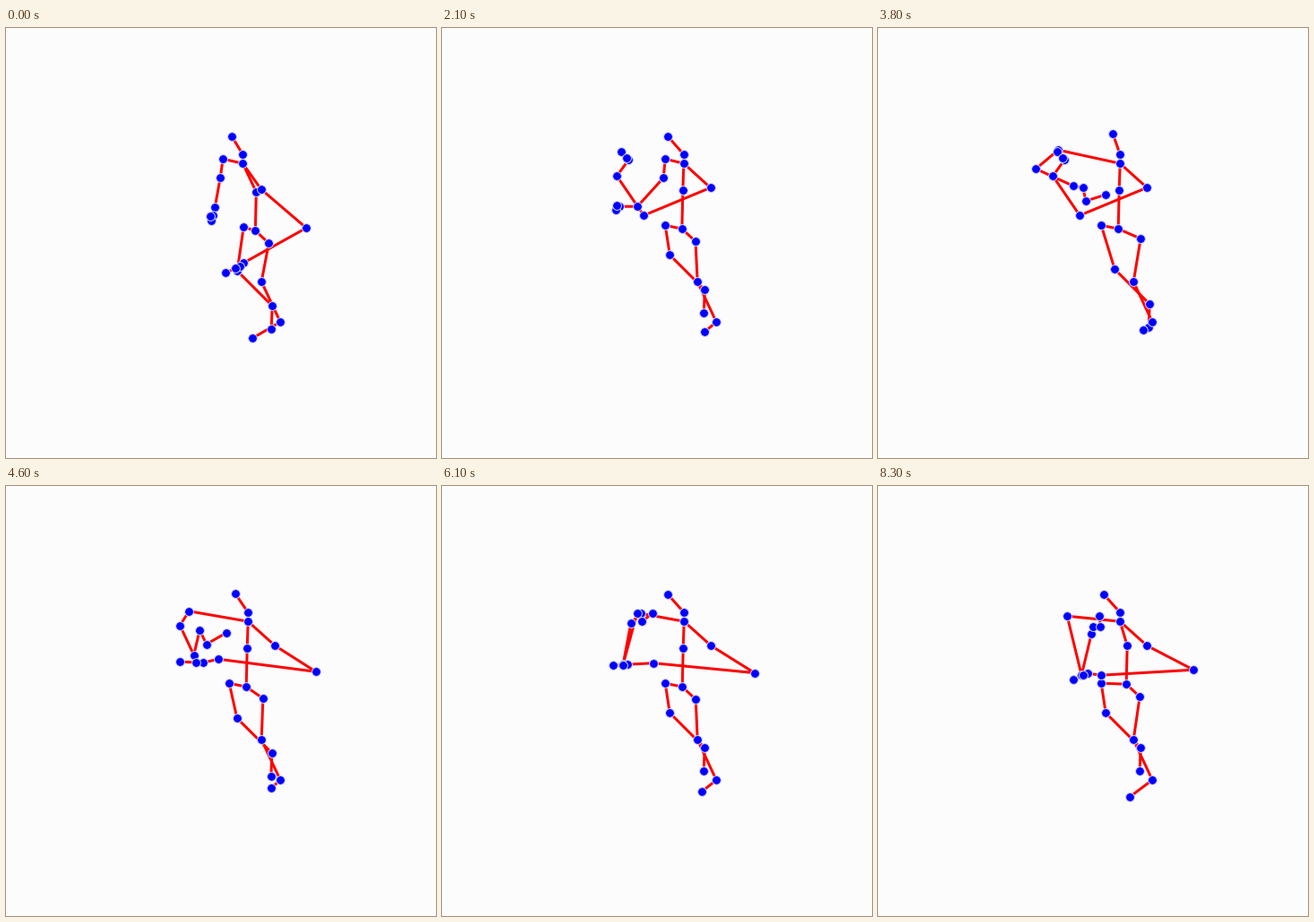
Recreate the animation shown at these times as a matplotlib script. Size 480 by 480 pixels, loop 8.4 s.

```python
import numpy as np
import matplotlib.pyplot as plt
from matplotlib.animation import FuncAnimation

SIZE, DPI = 480, 100
FRAMES, STEP_MS = 84, 100
PX = 72 / DPI
OFFSET = -0.8

REST = {
    "head": (253, 122), "neck": (271, 142), "chest": (271, 152),
    "waist": (270, 182), "base": (269, 225),
    "hip_l": (250, 221), "knee_l": (255, 254),
    "ankle_l": (294, 293), "foot_l": (293, 319),
    "hip_r": (284, 239), "knee_r": (286, 284),
    "ankle_r": (307, 329), "foot_r": (297, 338),
    "shoulder_r": (301, 179),
}

# Arm poses at key moments, eased in between.
LEFT_ARM = "shoulder_l elbow_l wrist_l hand_l tip_l".split()
LEFT_POSES = {
    9: [(243, 147), (240, 168), (228, 202), (226, 211), (224, 217)],
    21: [(250, 147), (248, 168), (219, 200), (199, 200), (195, 204)],
    38: [(202, 137), (177, 158), (219, 177), (230, 179), (255, 187)],
    54: [(208, 144), (213, 155), (202, 202), (204, 144), (239, 142)],
    69: [(241, 142), (210, 153), (204, 198), (236, 142), (233, 143)],
    83: [(212, 146), (228, 212), (239, 166), (241, 158), (248, 146)],
}
RIGHT_ARM = "elbow_r wrist_r hand_r tip_r".split()
GUARD = [(226, 210), (196, 166), (209, 148), (201, 139)]
RIGHT_POSES = {
    9: [(320, 222), (250, 261), (246, 265), (230, 272)],
    21: GUARD,
    38: GUARD,
    47: [(351, 208), (239, 195), (221, 200), (195, 199)],
    69: [(349, 210), (236, 200), (202, 200), (191, 202)],
    83: [(353, 206), (250, 212), (235, 210), (219, 217)],
}

# Passing shifts: peak frame, width, offset, joints that follow it.
LEFT_LEG = "knee_l ankle_l foot_l"
SHIFTS = [
    (0, 4, (16, 2), "waist base hip_l hip_r elbow_r wrist_r hand_r tip_r"),
    (0, 4, (4, 18), LEFT_LEG),
    (0, 4, (6, -1), "wrist_l hand_l tip_l"),
    (5, 9, (-8, 0), "neck chest waist base hip_r"),
    (4, 9, (-19, 2), "shoulder_r"),
    (31, 3, (-130, -10), "wrist_l hand_l tip_l"),
    (38, 8, (10, 16), LEFT_LEG),
    (38, 8, (10, -3), "hip_r head"),
    (83, 9, (9, -3), "waist base hip_r"),
    (0, 4, (-21, 9), "foot_r"),
    (25, 3, (-18, 12), "foot_r"),
    (76, 14, (-20, 13), "foot_r"),
]

CHAINS = ["head neck chest waist base"]
for s in "lr":
    CHAINS.append(f"chest shoulder_{s} elbow_{s} wrist_{s} hand_{s} thumb_{s} tip_{s}")
    CHAINS.append(f"base hip_{s} knee_{s} ankle_{s} foot_{s}")
CHAINS = [c.split() for c in CHAINS]


def blend(poses, i):
    times = list(poses)
    i = np.clip(i, times[0], times[-1])
    n = min(np.searchsorted(times, i, side="right"), len(times) - 1)
    a, b = times[n - 1], times[n]
    u = (i - a) / (b - a)
    u = u * u * (3 - 2 * u)
    return (1 - u) * np.array(poses[a]) + u * np.array(poses[b])


def pose(i):
    at = {name: np.array(p, float) for name, p in REST.items()}
    at.update(zip(LEFT_ARM, blend(LEFT_POSES, i)))
    at.update(zip(RIGHT_ARM, blend(RIGHT_POSES, i)))
    for peak, width, offset, names in SHIFTS:
        w = np.exp(-((i - peak) / width) ** 2)
        for name in names.split():
            at[name] = at[name] + w * np.array(offset)
    # Thumbs sit beside the line from hand to fingertip.
    for s, side in (("l", 0.5), ("r", 0)):
        hand = at["hand_" + s]
        dx, dy = at["tip_" + s] - hand
        at["thumb_" + s] = hand + (0.3 * dx - side * dy, 0.3 * dy + side * dx)
    return {name: p + OFFSET for name, p in at.items()}


fig = plt.figure(figsize=(SIZE / DPI, SIZE / DPI), dpi=DPI, facecolor="#fcfcfc")
ax = fig.add_axes([0, 0, 1, 1])
ax.set_xlim(0, SIZE)
ax.set_ylim(SIZE, 0)
ax.axis("off")
bones = [ax.plot([], [], color="red", lw=3 * PX)[0] for _ in CHAINS]
dots, = ax.plot([], [], "o", color="blue", ms=9.8 * PX, mew=PX,
                mec="#d0d0fa", zorder=3)


def draw(i):
    at = pose(i)
    for line, chain in zip(bones, CHAINS):
        line.set_data(*zip(*(at[j] for j in chain)))
    dots.set_data(*zip(*at.values()))
    return [*bones, dots]


anim = FuncAnimation(fig, draw, frames=FRAMES, interval=STEP_MS,
                     repeat=True, repeat_delay=0, blit=False)
plt.show()
```
